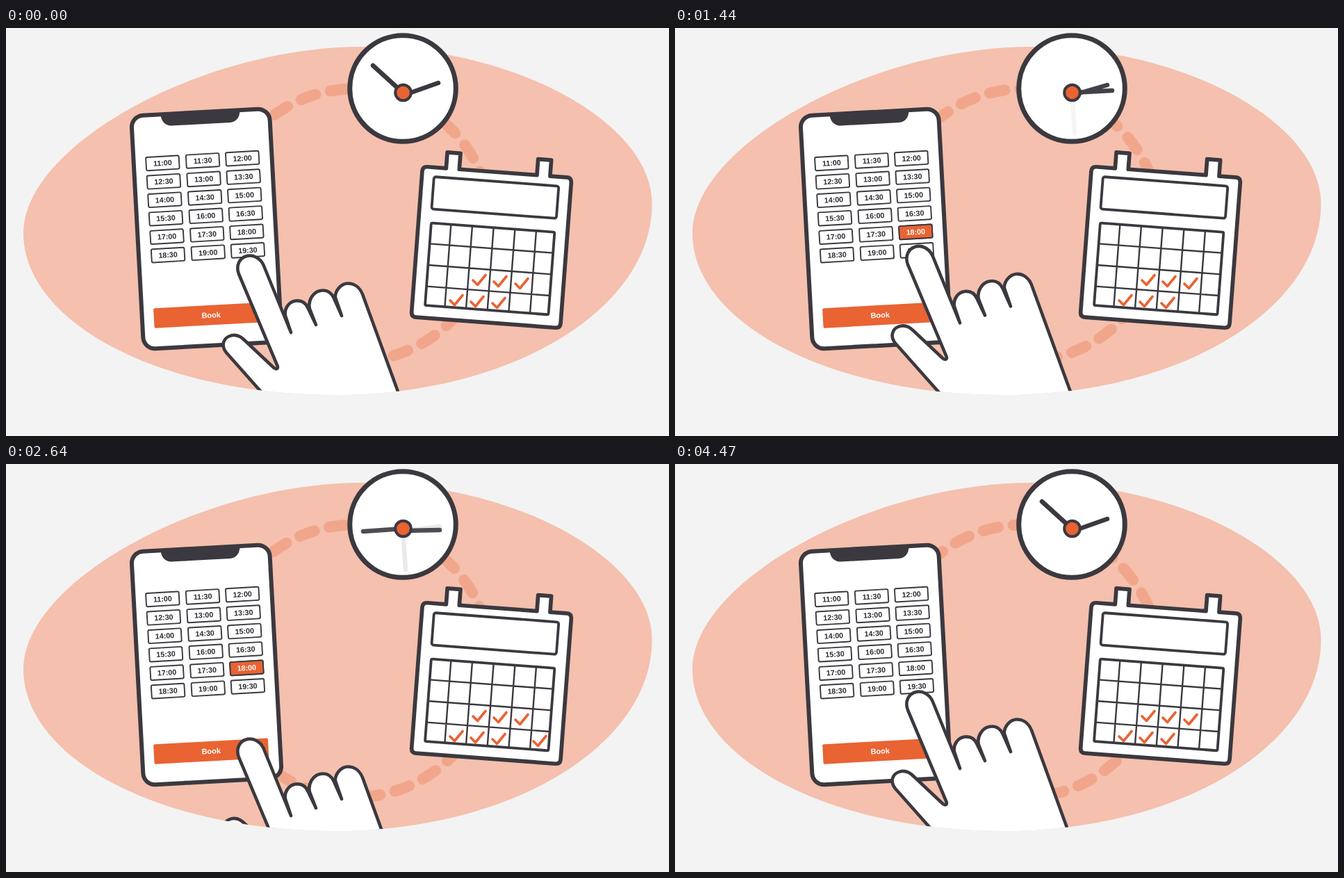
An HTML page for the animation above (4500 ms loop, 954 by 587 pixels).

```html
<!DOCTYPE html>
<html lang="en">
<head>
<meta charset="utf-8">
<title>Booking</title>
<style>
  html, body { margin: 0; width: 100%; height: 100%; overflow: hidden; background: #f3f3f3; }
  svg { display: block; width: 100%; height: 100%; }
  .ink { fill: #fff; stroke: #3b393f; stroke-linejoin: round; stroke-linecap: round; }
  .line { fill: none; }
  .tick { fill: none; stroke: #e96333; stroke-width: 3.7; stroke-linecap: round; stroke-linejoin: round; }
  text { font: bold 10.7px "Liberation Sans", Arial, sans-serif; text-anchor: middle; fill: #2b2a2e; }
  .light { fill: #fff; }
</style>
</head>
<body>
<svg viewBox="0 0 954 587">
  <defs>
    <path id="oval" d="M25 295C25 169 283 27 512 27C730 27 929.5 135 929.5 253C929.5 405 726 528 474 528S25 424 25 295Z"/>
    <clipPath id="ovalClip"><use href="#oval"/></clipPath>
  </defs>
  <use href="#oval" fill="#f5c0ae"/>
  <circle id="ring" cx="501.5" cy="283.5" r="196" pathLength="56" fill="none" stroke="#f1a68b"
    stroke-width="16" stroke-linecap="round" stroke-dasharray="1"/>

  <circle class="ink" cx="571" cy="87" r="76.3" stroke-width="7"/>
  <g id="clockHands" class="ink" stroke-width="6.5"></g>
  <circle cx="571.5" cy="93" r="11.3" fill="#e96333" stroke="#3b393f" stroke-width="4"/>

  <g class="ink" transform="translate(698.5 315.5) rotate(4.3)">
    <path stroke-width="5.7" d="M-100.5-108.5H-73.5v-23h19v23H57.5v-23h19v23H100.5q7 0 7 7V101.5q0 7-7 7H-100.5q-7 0-7-7V-101.5q0-7 7-7Z"/>
    <rect x="-90" y="-95" width="180" height="46.5" rx="3" stroke-width="3.8"/>
    <rect x="-89" y="-28.5" width="178" height="119" rx="2" stroke-width="3.8"/>
    <path stroke-width="2.4" d="M-60.5-28.5v119M-29.8-28.5v119M1-28.5v119M31.8-28.5v119M62.5-28.5v119M-89 1.5H89M-89 32.3H89M-89 63H89"/>
  </g>
  <g id="ticks"></g>

  <g transform="translate(288.5 289) rotate(-3.1)">
    <rect class="ink" x="-99.5" y="-168" width="199" height="336" rx="17" stroke-width="6"/>
    <path fill="#3b393f" d="M-57-168H57c0 10-6 17-15 17H-42c-9 0-15-7-15-17Z"/>
    <g id="slots" transform="rotate(-.25)"></g>
    <rect x="-82.5" y="110" width="165" height="28.5" rx="2" fill="#e96333"/>
    <text class="light" y="128" style="font-size:11px">Book</text>
  </g>

  <g clip-path="url(#ovalClip)">
    <path id="hand" class="ink" stroke-width="4.6" d="M435 600L317 467C309 457 313 447 321 443.5
      C329 440 337 443 343 449L385 488.5C389 492 392 490 390.5 486L335 354C330 341 337 331 345 328.5
      C355 325 366 331 370.5 341L410 438L402 414C400 404 407 393.5 417 392.5C427 391.5 432 397 434.5 403L446 427
      L437 404C434 392 442 380 452 378C462 376 468 381 471.5 388L483 414
      L474 388C473 378 482 368 491 367.5C501 367 509 373 513 383L592 600"/>
  </g>
</svg>
<script>
const LOOP = 4500;
const byId = id => document.getElementById(id);

function add(parent, tag, attrs, content = '') {
  const node = document.createElementNS('http://www.w3.org/2000/svg', tag);
  for (const key in attrs) node.setAttribute(key, attrs[key]);
  node.textContent = content;
  return parent.appendChild(node);
}

// Time slots: half-hourly, filling the grid row by row
const times = Array.from({ length: 18 }, (_, i) => {
  const half = 22 + i;
  return `${half >> 1}:${half % 2 ? '30' : '00'}`;
});
function addSlot(parent, index, picked) {
  const x = [-57.5, .3, 57.5][index % 3], y = -98.2 + 26.5 * Math.floor(index / 3);
  const group = add(parent, 'g', { transform: `translate(${x} ${y})` });
  add(group, 'rect', {
    class: 'ink', x: -23.8, y: -9.6, width: 47.6, height: 19.2, rx: 2, 'stroke-width': 1.9,
    style: picked ? 'fill:#e96333' : ''
  });
  add(group, 'text', { y: 3.6, class: picked ? 'light' : '' }, times[index]);
  return group;
}
times.forEach((_, i) => addSlot(byId('slots'), i, false));
const picked = addSlot(byId('slots'), 14, true);

const ticks = [[681, 362], [711, 364], [742, 367], [648, 391], [678, 393], [709, 395], [768, 398]]
  .map(([x, y]) => add(byId('ticks'), 'path', { class: 'tick', d: `M${x - 9} ${y + 1}l6.5 6.5 11.5-14` }));
const newTick = ticks[6];

// Tips of the minute and hour hands in each clock pose
const poses = [
  [528, 54, 622, 79], [583, 36, 622, 79], [629, 90, 622, 82], [575, 152, 624, 90], [514, 97, 624, 95]
].map(([mx, my, hx, hy]) => add(byId('clockHands'), 'path', {
  class: 'line', d: `M571 93L${mx} ${my}M574 96L${hx} ${hy}`
}));

const ramp = (t, from, to) => Math.min(1, Math.max(0, (t - from) / (to - from)));
const ease = (t, from, to) => (1 - Math.cos(Math.PI * ramp(t, from, to))) / 2;

function draw(t) {
  const handY = -34 * ease(t, 130, 1030) + 102 * ease(t, 1175, 2075) - 68 * ease(t, 2710, 3610);
  byId('hand').setAttribute('transform', `translate(0 ${handY})`);

  const turn = 2.64 - 19.8 * ramp(t, 900, 3470);
  byId('ring').setAttribute('transform', `rotate(${turn} 501.5 283.5)`);

  // Each pose cross-fades into the next, the last back into the first
  const fade = k => ramp(t, 82 + 664 * k, 716 + 664 * k);
  poses.forEach((pose, k) => {
    pose.style.opacity = k ? fade(k - 1) - fade(k) : 1 - fade(0) + fade(4);
  });

  const clear = ramp(t, 3800, 4450);
  picked.style.opacity = ramp(t, 940, 1120) - clear;
  newTick.style.opacity = ramp(t, 2150, 2550) - clear;
}

function loop() {
  draw(performance.now() % LOOP);
  requestAnimationFrame(loop);
}
loop();
</script>
</body>
</html>
```
